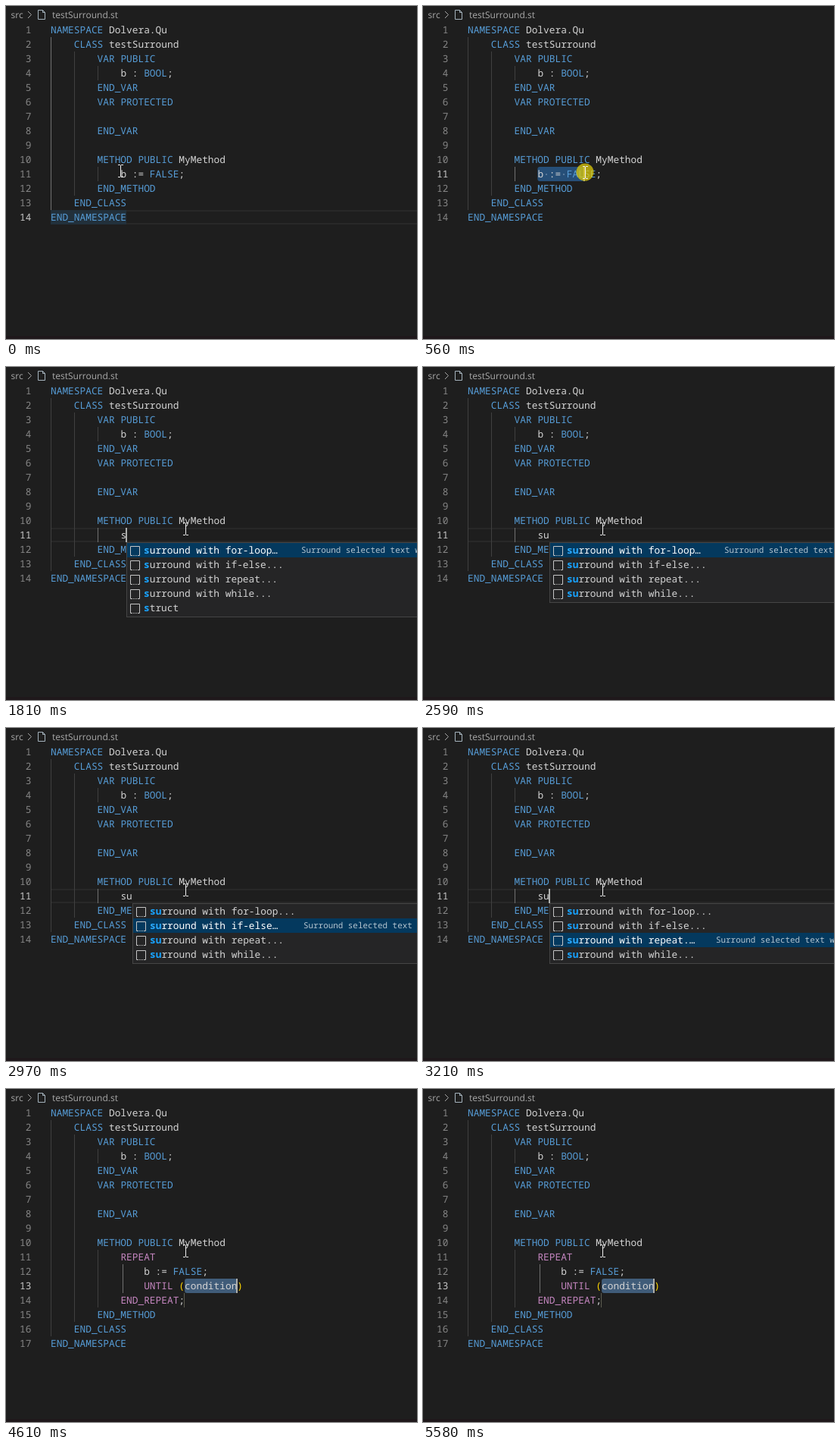
Animation of 543 by 439 pixels, one loop 5.75 s. Source, as an HTML page with a canvas:

```html
<!DOCTYPE html>
<html lang="en">
<head>
<meta charset="utf-8">
<title>Surround snippet</title>
<style>
html, body { margin: 0; width: 100%; height: 100%; overflow: hidden; background: #1e1e1e; }
canvas { display: block; }
</style>
</head>
<body>
<canvas id="stage" width="543" height="439"></canvas>
<script>
const ctx = document.getElementById('stage').getContext('2d');
const LOOP = 5750, W = 543, H = 439;
const LEFT = 59, TOP = 22, ROW = 19, CHAR = 7.698;
const MONO = '"Noto Sans Mono", monospace';
const CODE = '12.83px ' + MONO;
const TEXT = '#d4d4d4', BLUE = '#569cd6', PINK = '#c586c0', GOLD = '#ffd700';

const HEAD = [
  'NAMESPACE Dolvera.Qu',
  '    CLASS testSurround',
  '        VAR PUBLIC',
  '            b : BOOL;',
  '        END_VAR',
  '        VAR PROTECTED',
  '',
  '        END_VAR',
  '',
  '        METHOD PUBLIC MyMethod'
];
const TAIL = ['        END_METHOD', '    END_CLASS', 'END_NAMESPACE'];
const STATEMENT = ['            b := FALSE;'];
const LOOP_BODY = [
  '            REPEAT',
  '                b := FALSE;',
  '                UNTIL (condition)',
  '            END_REPEAT;'
];
const KEYWORD = /^(NAMESPACE|CLASS|VAR|PUBLIC|PROTECTED|BOOL|METHOD|FALSE|END_(VAR|METHOD|CLASS|NAMESPACE))$/;
const CONTROL = /^(REPEAT|UNTIL|END_REPEAT)$/;
const ITEMS = ['for-loop', 'if-else', 'repeat', 'while'].map(s => `surround with ${s}...`);
const SHORT = ['surround with for-loop…', 'surround with if-else…', 'surround with repeat.…'];
const DETAIL_OFFSET = [231, 226, 220];

// time, x, y, button held
const POINTER = [
  [0, 151, 217, 0], [90, 151, 218, 1], [170, 153, 219, 1], [250, 160, 219, 1],
  [330, 172, 219, 1], [410, 186, 219, 1], [480, 200, 219, 1], [560, 214, 219, 1],
  [640, 222, 220, 1], [710, 229, 220, 1], [790, 235, 220, 1], [880, 238, 220, 1],
  [1110, 238, 219, 0], [1190, 238, 216, 0], [1260, 237, 213, 0]
];

const colX = col => LEFT + col * CHAR;
const rowY = line => TOP + (line - 1) * ROW;

function rect(x, y, w, h, color) {
  ctx.fillStyle = color;
  ctx.fillRect(x, y, w, h);
}

function write(text, x, y, color, font = CODE) {
  ctx.font = font;
  ctx.fillStyle = color;
  ctx.fillText(text, x, y);
}

function path(points, color) {
  ctx.strokeStyle = color;
  ctx.lineWidth = 1;
  ctx.beginPath();
  points.forEach(([x, y], i) => i ? ctx.lineTo(x, y) : ctx.moveTo(x, y));
  ctx.stroke();
}

function tokenColor(token) {
  if (KEYWORD.test(token)) return BLUE;
  if (CONTROL.test(token)) return PINK;
  return /^[()]$/.test(token) ? GOLD : TEXT;
}

function drawLine(text, line) {
  for (const m of text.matchAll(/[\w.]+|[()]|[^\s\w()]+/g))
    write(m[0], colX(m.index), rowY(line) + 14, tokenColor(m[0]));
}

function drawNumber(line, active) {
  const label = String(line);
  write(label, 33.4 - label.length * CHAR, rowY(line) + 14, active ? '#c6c6c6' : '#858585');
}

function guide(x, from, to, active) {
  rect(x, rowY(from), 1, (to - from + 1) * ROW, active ? '#707070' : '#404040');
}

function selection(line, from, to, color) {
  ctx.fillStyle = color;
  ctx.beginPath();
  ctx.roundRect(colX(from), rowY(line), (to - from) * CHAR, ROW, 3);
  ctx.fill();
}

function caret(line, col) {
  rect(Math.round(colX(col)) - 1, rowY(line), 2, ROW, '#aeafad');
}

function currentLine(line) {
  rect(LEFT, rowY(line), W, 2, '#282828');
  rect(LEFT, rowY(line) + ROW - 2, W, 2, '#282828');
}

function drawBreadcrumb() {
  const font = '12px "Open Sans", sans-serif', gray = '#a9a9a9';
  write('src', 6.5, 16, gray, font);
  path([[29, 7], [33.5, 11.5], [29, 16]], gray);
  path([[48.5, 5.5], [42.5, 5.5], [42.5, 17.5], [51.5, 17.5], [51.5, 8.5],
        [48.5, 5.5], [48.5, 8.5], [51.5, 8.5]], '#a5b3bd');
  write('testSurround.st', 61, 16, gray, font);
}

function drawIcon(x, y) {
  const color = '#c5c5c5';
  path([[x + 3, y + 12.5], [x + .5, y + 12.5], [x + .5, y + .5],
        [x + 12.5, y + .5], [x + 12.5, y + 12.5], [x + 10, y + 12.5]], color);
  for (const dx of [4, 6, 8]) rect(x + dx, y + 12, 1, 1, color);
}

function drawPopup(x, typed, chosen) {
  const items = typed === 's' ? [...ITEMS, 'struct'] : ITEMS;
  const top = 231, height = items.length * ROW + 4;
  rect(x, top, W, height, '#454545');
  rect(x + 1, top + 1, W, height - 2, '#252526');
  items.forEach((item, i) => {
    const y = top + 1 + i * ROW, focused = i === chosen;
    if (focused) rect(x + 1, y, W, ROW, '#04395e');
    drawIcon(x + 5, y + 4);
    const label = focused ? SHORT[i] : item;
    write(typed, x + 23, y + 14, focused ? '#2aaaff' : '#18a3ff', 'bold ' + CODE);
    write(label.slice(typed.length), x + 23 + typed.length * CHAR, y + 14, focused ? '#fff' : TEXT);
    if (focused)
      write('Surround selected text with', x + DETAIL_OFFSET[i], y + 13, '#b4c4cf', '10.9px ' + MONO);
  });
}

function drawPointer({ x, y, held }) {
  if (held) {
    ctx.fillStyle = 'rgba(222,202,10,.75)';
    ctx.beginPath();
    ctx.arc(x, y, 11.5, 0, Math.PI * 2);
    ctx.fill();
  }
  rect(x, y - 7, 1, 15, '#f0f0f0');
  for (const end of [y - 8, y + 8]) {
    rect(x - 3, end, 3, 1, '#f0f0f0');
    rect(x + 1, end, 3, 1, '#f0f0f0');
  }
}

function pointerAt(t) {
  const [, x, y, held] = POINTER.findLast(p => p[0] <= t);
  return { x, y, held };
}

function drawSelecting(t, pointer) {
  if (t < 90) {
    currentLine(14);
    rect(LEFT, rowY(14), 13 * CHAR, ROW, '#22303b');
    return;
  }
  const count = Math.max(0, Math.min(11, Math.round((pointer.x - colX(12)) / CHAR)));
  if (count) selection(11, 12, 12 + count, '#264f78');
  for (const dot of [1, 4])
    if (count > dot) rect(Math.round(colX(12.5 + dot)) - 1, rowY(11) + 9, 2, 2, '#58789a');
  if (t < 1260) caret(11, 12 + count);
}

function draw(t) {
  const typing = t >= 1810 && t < 3610, done = t >= 3610;
  const typed = t < 2120 ? 's' : 'su';
  const body = done ? LOOP_BODY : typing ? [' '.repeat(12) + typed] : STATEMENT;
  const lines = [...HEAD, ...body, ...TAIL], last = lines.length;
  const active = done ? 13 : t < 90 ? 14 : 11;
  const pointer = pointerAt(t);

  rect(0, 0, W, H, '#1e1e1e');
  rect(0, 435, W, 4, '#1f181b');
  drawBreadcrumb();

  if (typing) currentLine(11);
  if (t < 1810) drawSelecting(t, pointer);
  if (done) {
    selection(13, 23, 32, '#405c79');
    rect(235, rowY(14), 1, ROW, '#5c5c50');
  }

  guide(59, 2, last - 1, t < 90);
  guide(90, 3, last - 2);
  guide(121, 4, 4);
  guide(121, 11, last - 3, active === 11);
  if (done) guide(154, 12, 13, true);

  lines.forEach((text, i) => {
    drawNumber(i + 1, i + 1 === active);
    drawLine(text, i + 1);
  });

  if (typing) {
    if (t < 2590 || t >= 3140) caret(11, 12 + typed.length);
    drawPopup(Math.round(colX(12 + typed.length)), typed, t < 2970 ? 0 : t < 3210 ? 1 : 2);
  }
  if (done && (t < 4080 || (t >= 4610 && t < 5090) || t >= 5580)) caret(13, 32);
  drawPointer(pointer);
}

ctx.textRendering = 'geometricPrecision';
const start = performance.now();
function tick() {
  draw((performance.now() - start) % LOOP);
  requestAnimationFrame(tick);
}
tick();
</script>
</body>
</html>
```
